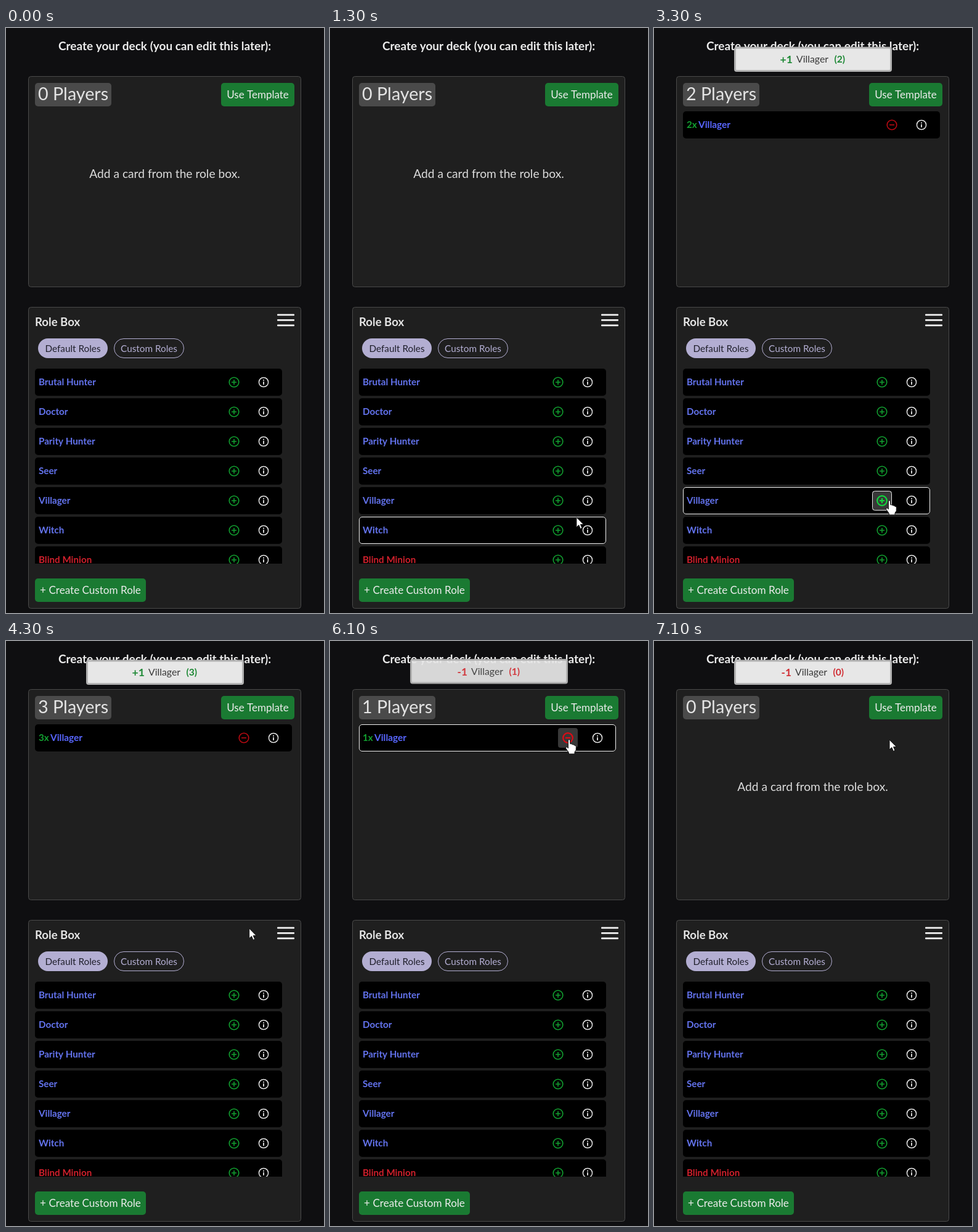
Recreate the animation shown at these times as an HTML page with a canvas. Size 516x948 px, loop 7.2 s.

```html
<!DOCTYPE html>
<html lang="en">
<head>
<meta charset="utf-8">
<title>Deck builder</title>
<style>
  html, body { margin: 0; width: 100%; height: 100%; overflow: hidden; background: #0f0f11; }
  canvas { display: block; }
</style>
</head>
<body>
<canvas id="stage" width="516" height="948"></canvas>
<script>
const ctx = document.getElementById('stage').getContext('2d');
const LOOP = 7200;
const FONT = 'Lato, "Open Sans", sans-serif';
const BLUE = '#6373ee', GREEN = '#12a030', RED = '#d0202c', LIGHT = '#e4e4e4';
const LILAC = '#b3aed2', BUTTON = '#1a7a32', PANEL = '#1f1f1f';

const ROLES = ['Brutal Hunter', 'Doctor', 'Parity Hunter', 'Seer', 'Villager', 'Witch', 'Blind Minion'];

// press: button goes down, at: click takes effect
const CLICKS = [
  { press: 1880, at: 1968, step: 1, count: 1 },
  { press: 2670, at: 2755, step: 1, count: 2 },
  { press: 3260, at: 3320, step: 1, count: 3 },
  { press: 5260, at: 5324, step: -1, count: 2 },
  { press: 5770, at: 5832, step: -1, count: 1 },
  { press: 6470, at: 6560, step: -1, count: 0 }
];
const TOAST_STAY = 1480, FADE = 400;

// time, x, y of the pointer tip
const PATH = [
  [760, 478, 960], [1000, 455, 880], [1300, 400, 793], [1500, 388, 769], [1700, 382, 766],
  [3850, 382, 766], [4100, 392, 640], [4400, 396, 380], [4700, 390, 185], [4900, 388, 160],
  [6600, 388, 160], [7050, 382, 160]
];

// cubic-bezier(.25, .1, .25, 1)
function ease(x) {
  if (x <= 0) return 0;
  if (x >= 1) return 1;
  let lo = 0, hi = 1, u = x;
  for (let i = 0; i < 20; i++) {
    u = (lo + hi) / 2;
    if (0.75 * u * (1 - u) + u ** 3 < x) lo = u; else hi = u;
  }
  return 0.3 * u * (1 - u) ** 2 + 3 * u * u * (1 - u) + u ** 3;
}

function pointerAt(t) {
  if (t < PATH[0][0]) return { x: -99, y: -99 };
  for (let i = 1; i < PATH.length; i++) {
    const [t0, x0, y0] = PATH[i - 1], [t1, x1, y1] = PATH[i];
    if (t < t1) {
      const k = (t - t0) / (t1 - t0);
      return { x: x0 + (x1 - x0) * k, y: y0 + (y1 - y0) * k };
    }
  }
  const [, x, y] = PATH[PATH.length - 1];
  return { x, y };
}

const inside = (p, x, y, w, h) => p.x >= x && p.x < x + w && p.y >= y && p.y < y + h;

function box(x, y, w, h, r, fill, stroke, line = 1) {
  ctx.beginPath();
  ctx.roundRect(x, y, w, h, r);
  if (fill) { ctx.fillStyle = fill; ctx.fill(); }
  if (stroke) { ctx.strokeStyle = stroke; ctx.lineWidth = line; ctx.stroke(); }
}

function text(str, x, y, size, color, weight = 400, align = 'left') {
  ctx.font = `${weight} ${size}px ${FONT}`;
  ctx.textAlign = align;
  ctx.fillStyle = color;
  ctx.fillText(str, x, y);
}

function ring(x, y, r, color, width) {
  ctx.strokeStyle = color;
  ctx.lineWidth = width;
  ctx.beginPath();
  ctx.arc(x, y, r, 0, Math.PI * 2);
  ctx.stroke();
}

function stepIcon(x, y, sign, hover, pressed) {
  if (hover) box(x - 16, y - 16, 32, 32, 4, '#383838');
  if (pressed) box(x - 15.5, y - 15.5, 31, 31, 4, null, '#e8e8e8');
  const color = sign > 0 ? (hover ? '#10d83c' : GREEN) : (hover ? '#e00a14' : '#bd0a12');
  ring(x, y, 7.8, color, hover ? 2.2 : 1.6);
  ctx.beginPath();
  ctx.moveTo(x - 4, y);
  ctx.lineTo(x + 4, y);
  if (sign > 0) {
    ctx.moveTo(x, y - 4);
    ctx.lineTo(x, y + 4);
  }
  ctx.stroke();
}

function infoIcon(x, y, hover) {
  if (hover) box(x - 16, y - 16, 32, 32, 4, '#383838');
  ring(x, y, 7.6, LIGHT, 1.5);
  ctx.fillStyle = LIGHT;
  ctx.fillRect(x - 0.9, y - 4.2, 1.8, 1.9);
  ctx.fillRect(x - 0.9, y - 1, 1.8, 5);
}

// draws one role row, returns true when the pointer is over one of its buttons
function row(y, w, sign, p, pressed, label) {
  const mid = y + 22, stepX = 47 + w - 78, infoX = stepX + 48;
  const over = inside(p, 47, y, w, 44);
  const overStep = inside(p, stepX - 16, mid - 16, 32, 32);
  const overInfo = inside(p, infoX - 16, mid - 16, 32, 32);
  box(47, y, w, 44, 5, '#000');
  if (over) box(47.5, y + 0.5, w - 1, 43, 4.5, null, '#f0f0f0');
  label(mid + 5);
  stepIcon(stepX, mid, sign, overStep, overStep && pressed);
  infoIcon(infoX, mid, overInfo);
  return overStep || overInfo;
}

function deckPanel(count, p, pressed) {
  box(36.5, 78.5, 442, 341, 4, PANEL, '#4a4a4a');
  box(47, 89, 124, 38, 5, '#4a4a4a');
  text(count + ' Players', 52, 117, 28.7, LIGHT);
  box(349, 89, 119, 38, 5, BUTTON);
  text('Use Template', 408.5, 114, 17, '#ececec', 400, 'center');
  if (!count) {
    text('Add a card from the role box.', 257.5, 243, 19.2, '#dcdcdc', 400, 'center');
    return false;
  }
  return row(135, 417, -1, p, pressed, y => {
    text(count + 'x', 53, y, 15.2, GREEN, 700);
    text('Villager', 72, y, 15.4, '#5866ff', 700);
  });
}

function rolePanel(p, pressed) {
  box(36.5, 452.5, 442, 488, 4, PANEL, '#4a4a4a');
  text('Role Box', 47, 483, 18.6, LIGHT, 700);
  for (let i = 0; i < 3; i++) box(440, 463.5 + i * 8.5, 28, 2.8, 1, '#f2f2f2');
  box(52, 503, 113, 32, 16, LILAC);
  text('Default Roles', 108.5, 524.5, 15.3, '#20202c', 400, 'center');
  box(175.5, 503.5, 113, 31, 15.5, null, LILAC);
  text('Custom Roles', 232, 524.5, 15.3, LILAC, 400, 'center');

  ctx.save();
  ctx.beginPath();
  ctx.rect(40, 552, 430, 316);
  ctx.clip();
  const seen = p.y < 868 ? p : { x: -99, y: -99 };
  let hot = false;
  ROLES.forEach((name, i) => {
    const color = i === 6 ? RED : BLUE;
    if (row(552 + i * 48, 401, 1, seen, pressed, y => text(name, 53, y, 15.2, color, 700))) hot = true;
  });
  ctx.restore();

  box(47, 892, 180, 38, 5, BUTTON);
  text('+ Create Custom Role', 137, 917, 17.1, '#ececec', 400, 'center');
  return hot;
}

function toast(t, click) {
  const age = t - click.at;
  const show = age < TOAST_STAY ? ease(age / FADE) : 1 - ease((age - TOAST_STAY) / FADE);
  if (show <= 0) return;
  const plus = click.step > 0, shift = plus ? 0 : -2;
  const color = plus ? '#1c8834' : '#d12c32';
  ctx.save();
  ctx.globalAlpha = show;
  ctx.translate(0, -20 * (1 - show));
  box(131.5, 32, 253, 37.5, 2.5, '#e7e7e7', '#b2b2b2', 3);
  text(plus ? '+1' : '-1', plus ? 204.5 : 206.5, 57, plus ? 17.6 : 17.2, color, 700);
  text('Villager', 231 + shift, 56, 15.8, '#383838');
  text(`(${click.count})`, 292.5 + shift, 56, 15.6, color, 700);
  ctx.restore();
}

function shape(points, x, y) {
  ctx.beginPath();
  for (let i = 0; i < points.length; i += 2) ctx.lineTo(x + points[i], y + points[i + 1]);
  ctx.closePath();
  ctx.fillStyle = '#fff';
  ctx.strokeStyle = '#111';
  ctx.lineWidth = 1;
  ctx.lineJoin = 'round';
  ctx.fill();
  ctx.stroke();
}

const ARROW = [0, 0, 0, 16, 3.8, 12.6, 6.4, 18.6, 9, 17.4, 6.5, 11.6, 11.4, 11.6];
const HAND = [-1.6, 0.6, 0, -0.4, 1.6, 0.6, 1.8, 6.6, 4.6, 6.8, 5.2, 7.8, 8, 8, 8.8, 9.2,
  10.6, 9.6, 11.4, 11, 11.2, 16.6, 9, 20, 9, 23, -0.4, 23, -1, 20, -5.4, 14,
  -5.2, 12, -3.6, 11.8, -1.6, 13.8];

function draw(t) {
  const p = pointerAt(t);
  const done = CLICKS.filter(c => t >= c.at);
  const last = done[done.length - 1];
  const pressed = CLICKS.some(c => t >= c.press && t < c.at);

  ctx.fillStyle = '#0f0f11';
  ctx.fillRect(0, 0, 516, 948);
  text('Create your deck (you can edit this later):', 257.5, 36, 19, '#ececec', 700, 'center');
  const hotDeck = deckPanel(last ? last.count : 0, p, pressed);
  const hotRole = rolePanel(p, pressed);
  if (last) toast(t, last);
  shape(hotDeck || hotRole ? HAND : ARROW, p.x, p.y);
}

const start = performance.now();
function tick() {
  draw((performance.now() - start) % LOOP);
  requestAnimationFrame(tick);
}
tick();
</script>
</body>
</html>
```
